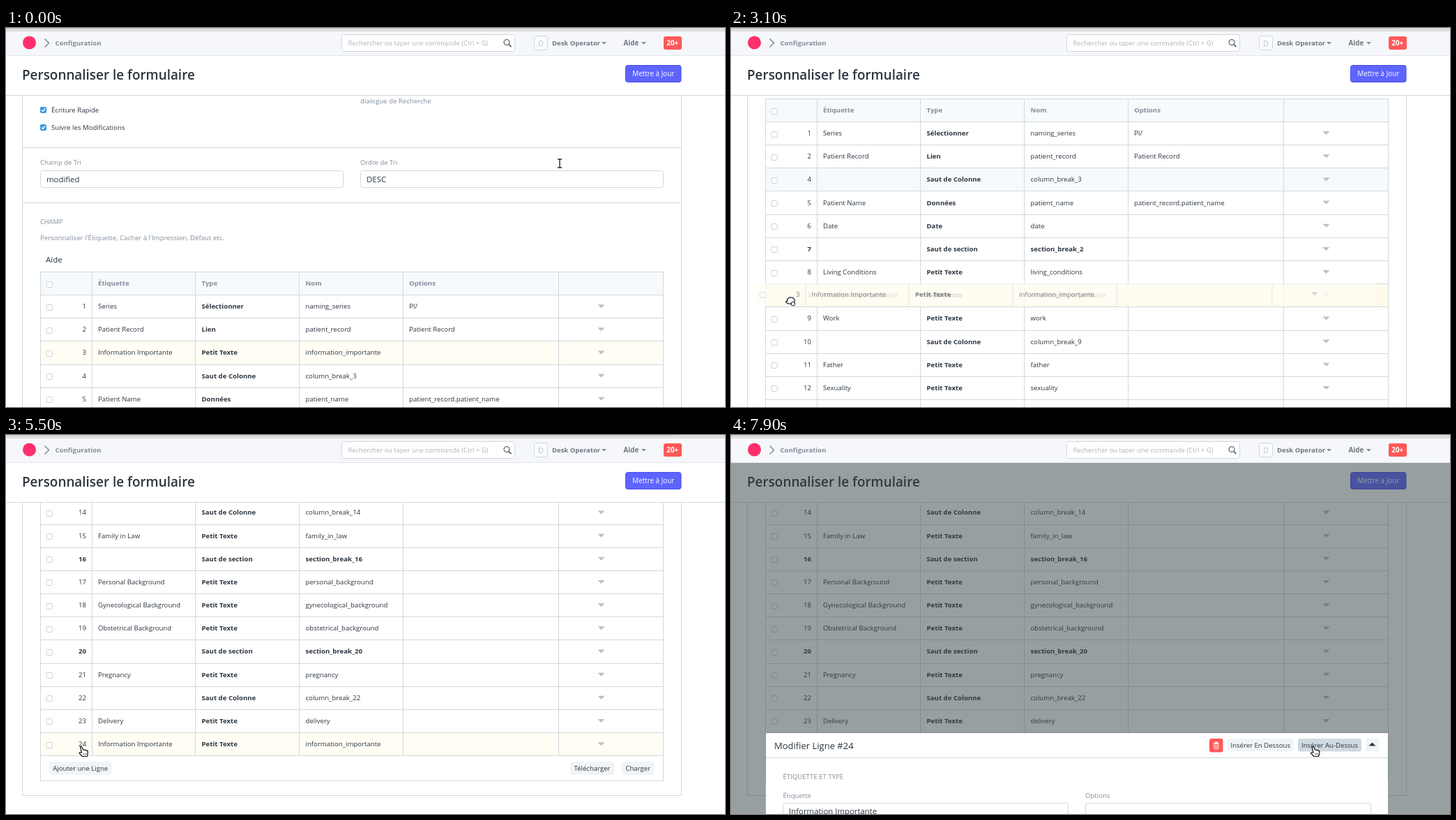
An HTML page with a canvas for the animation above (8 s loop, 1031 by 543 pixels).

```html
<!DOCTYPE html>
<html lang="fr">
<head>
<meta charset="utf-8">
<title>Personnaliser le formulaire</title>
<style>
html, body { margin: 0; width: 100%; height: 100%; overflow: hidden; background: #fff; }
canvas { display: block; width: 100%; height: 100%; }
</style>
</head>
<body>
<canvas id="stage" width="1031" height="543"></canvas>
<script>
const ctx = document.getElementById('stage').getContext('2d');
const INK = '#2c3640', MUTED = '#808d9a', LINE = '#d1d8dd', PALE = '#f7fafc',
  BUTTON = '#f0f4f7', RED = '#ff5858', CREAM = '#fffdf4';
const LOOP = 8000, STEP = 100, PITCH = 33.17, FIRST_ROW = PITCH * 1.5, SMALL = 9.65;
const COLUMNS = [123, 271, 420, 569, 792];

const rows = `Series|Sélectionner|naming_series|PI/
Patient Record|Lien|patient_record|Patient Record
Information Importante|Petit Texte|information_importante
|Saut de Colonne|column_break_3
Patient Name|Données|patient_name|patient_record.patient_name
Date|Date|date
|Saut de section|section_break_2
Living Conditions|Petit Texte|living_conditions
Work|Petit Texte|work
|Saut de Colonne|column_break_9
Father|Petit Texte|father
Sexuality|Petit Texte|sexuality
Mother|Petit Texte|mother
Siblings|Petit Texte|siblings
|Saut de Colonne|column_break_14
Family in Law|Petit Texte|family_in_law
|Saut de section|section_break_16
Personal Background|Petit Texte|personal_background
Gynecological Background|Petit Texte|gynecological_background
Obstetrical Background|Petit Texte|obstetrical_background
|Saut de section|section_break_20
Pregnancy|Petit Texte|pregnancy
|Saut de Colonne|column_break_22
Delivery|Petit Texte|delivery`.split('\n').map((line, i) => {
  const [label, type, name, options = ''] = line.split('|');
  return { id: i + 1, label, type, name, options };
});
const moved = rows[2];
const others = rows.filter(r => r !== moved);

// Keyframes: time, then values
const scrollKeys = [[0, 349.4], [100, 312], [200, 299.8], [1200, 299.8], [1700, 101.3],
  [3500, 101.3], [4400, -369.5]];
const dragKeys = [[2700, 0, 217], [2800, -3, 228], [2900, -8, 262], [3000, -13, 320],
  [3100, -16.5, 381.6], [3300, -22, 475], [3500, -22, 520], [4600, -22, 520],
  [4700, 0, 177.7], [4800, 3, 290], [4900, 7, 471], [5000, 9, 443.5]];
const cursorKeys = [[0, 790, 187], [300, 790, 187], [900, 768, 210], [1500, 768, 210],
  [2000, 143, 243], [2100, 97.5, 219], [2300, 94.5, 220], [5500, 104, 446], [5700, 104, 446],
  [6200, 1005, 430], [6300, 960, 436], [6400, 881.5, 441], [6600, 852, 441], [6800, 850, 439],
  [7300, 851, 440], [7700, 832, 447], [7900, 830.5, 446]];
const fadeKeys = [[6900, 0], [7000, 0.12], [7200, 0.5]];

function at(keys, t) {
  const i = keys.findIndex(k => k[0] > t);
  if (i === 0) return keys[0].slice(1);
  if (i < 0) return keys[keys.length - 1].slice(1);
  const a = keys[i - 1], b = keys[i], p = (t - a[0]) / (b[0] - a[0]);
  return a.slice(1).map((v, n) => v + (b[n + 1] - v) * p);
}

function rect(x, y, w, h, color) {
  ctx.fillStyle = color;
  ctx.fillRect(x, y, w, h);
}
function box(x, y, w, h, fill, stroke, r = 3) {
  ctx.beginPath();
  ctx.roundRect(x, y, w, h, r);
  if (fill) { ctx.fillStyle = fill; ctx.fill(); }
  if (stroke) { ctx.strokeStyle = stroke; ctx.lineWidth = 1; ctx.stroke(); }
}
function text(s, x, cy, size = SMALL, color = INK, weight = 500, align = 'left') {
  ctx.font = `${weight} ${size}px "Open Sans", "Noto Sans", sans-serif`;
  ctx.textAlign = align;
  ctx.fillStyle = color;
  ctx.fillText(s, x, Math.round(cy + size * 0.36));
}
function line(points, color, width) {
  ctx.beginPath();
  points.forEach(([x, y]) => ctx.lineTo(x, y));
  ctx.strokeStyle = color;
  ctx.lineWidth = width;
  ctx.stroke();
}
function caret(x, y, half, h, color) {
  ctx.beginPath();
  ctx.moveTo(x - half, y - h / 2);
  ctx.lineTo(x + half, y - h / 2);
  ctx.lineTo(x, y + h / 2);
  ctx.fillStyle = color;
  ctx.fill();
}
const hline = (x1, x2, y) => rect(x1, Math.floor(y), x2 - x1, 1, LINE);
const vline = (x, y1, y2) => rect(x, y1, 1, y2 - y1, LINE);

function button(s, x, w, cy, fill = BUTTON) {
  box(x, cy - 9.5, w, 18.5, fill);
  text(s, x + w / 2, cy - 0.3, 9.6, INK, 500, 'center');
}
function input(s, x, y, w) {
  box(x + 0.5, Math.floor(y) + 0.5, w, 24, '#fff', LINE);
  text(s, x + 9, y + 12.3, 11.4);
}
function checked(y, label) {
  box(49, y - 4.5, 9, 9, '#3b99e0', null, 2);
  line([[51, y], [53, y + 2], [56.3, y - 2.3]], '#fff', 1.4);
  text(label, 65, y);
}
function emptyCheck(y) {
  box(58, Math.round(y) - 2.5, 8.5, 8, '#fff', '#c9d0d6', 2);
}

const fillRow = (cy, color) => rect(50, Math.floor(cy - PITCH / 2) + 1, 892, 33, color);

function rowCells(cy, row, num) {
  const top = Math.floor(cy - PITCH / 2), mid = cy - 0.5;
  const weight = row.type === 'Saut de section' ? 700 : 500;
  COLUMNS.forEach(x => vline(x, top + 1, top + 34));
  emptyCheck(mid);
  text(num, 115, mid, SMALL, INK, weight, 'right');
  text(row.label, 132, mid);
  text(row.type, 280.5, mid, SMALL, INK, 700);
  text(row.name, 429.5, mid, SMALL, INK, weight);
  text(row.options, 578, mid);
  caret(853.5, mid, 5, 5, '#b8c0c7');
}

function topFields(y) {
  text('dialogue de Recherche', 508, y - 245, SMALL, MUTED);
  checked(y - 232, 'Écriture Rapide');
  checked(y - 207, 'Suivre les Modifications');
  hline(24, 968, y - 178);
  text('Champ de Tri', 49, y - 156.5, 9.5, MUTED);
  text('Ordre de Tri', 508, y - 156.5, 9.5, MUTED);
  input('modified', 49, y - 145, 434);
  input('DESC', 508, y - 145, 434);
  hline(24, 968, y - 99.2);
  text('CHAMP', 49, y - 72, 9.2, MUTED);
  text("Personnaliser l'Étiquette, Cacher à l'Impression, Défaut etc.", 49, y - 49, SMALL, MUTED);
  text('Aide', 57, y - 17.3, 11.5);
}

function grid(t, y, drag, dragging) {
  const end = y + 25 * PITCH;
  rect(50, y, 892, PITCH, PALE);
  [49, 942].forEach(x => vline(x, Math.floor(y), end + 36));
  COLUMNS.forEach(x => vline(x, Math.floor(y), Math.floor(y + PITCH)));
  hline(49, 943, y);
  hline(49, 943, y + PITCH);
  emptyCheck(y + 16.2);
  ['Étiquette', 'Type', 'Nom', 'Options'].forEach((s, i) =>
    text(s, [132, 280.5, 429.5, 578][i], y + 16.2, SMALL, MUTED, 700));

  const last = t < 4700 ? 16 : 24;
  const slot = t < 2700 ? 3
    : Math.max(3, Math.min(last, Math.round((drag[1] - y - FIRST_ROW) / PITCH) + 1));
  const list = [...others.slice(0, slot - 1), moved, ...others.slice(slot - 1)];
  list.forEach((row, i) => {
    const cy = y + FIRST_ROW + i * PITCH;
    if (cy < 70 || cy > 570) return;
    const ghost = row === moved && dragging;
    if (row === moved) fillRow(cy, ghost ? '#fffbeb' : CREAM);
    else if (row.id === 4 && t >= 2800 && t < 3600) fillRow(cy, PALE);
    hline(49, 943, y + (i + 2) * PITCH);
    ctx.globalAlpha = ghost ? 0.5 : 1;
    rowCells(cy, row, t < 5500 ? row.id : i + 1);
    ctx.globalAlpha = 1;
  });

  hline(50, 942, end + 36);
  button('Ajouter une Ligne', 62, 89.5, end + 18);
  button('Télécharger', 809, 63, end + 18);
  button('Charger', 883, 46.5, end + 18);
}

function content(t) {
  const [y] = at(scrollKeys, t), drag = at(dragKeys, t);
  const dragging = (t >= 2700 && t < 4100) || (t >= 4700 && t < 5500);
  ctx.save();
  ctx.beginPath();
  ctx.rect(0, 97, 1031, 446);
  ctx.clip();
  const cardEnd = y + 25 * PITCH + 57;
  vline(23, 97, Math.min(543, cardEnd));
  vline(968, 97, Math.min(543, cardEnd));
  hline(23, 969, cardEnd);
  topFields(y);
  grid(t, y, drag, dragging);
  if (dragging) {
    ctx.translate(drag[0], 0);
    ctx.globalAlpha = 0.65;
    fillRow(drag[1], CREAM);
    rowCells(drag[1], moved, 3);
  }
  ctx.restore();
  return dragging ? [94.5 + drag[0], drag[1] + 2.5] : null;
}

function pageHead() {
  text('Personnaliser le formulaire', 23, 67, 18.9, INK, 600);
  box(888.5, 53.5, 79.5, 24, '#5e64ff', '#484fec');
  text('Mettre à Jour', 928.3, 65, 9.9, '#fff', 500, 'center');
  rect(0, 96, 1031, 1, LINE);
}

function navbar() {
  rect(0, 0, 1031, 40, '#f5f7fa');
  rect(0, 0, 1031, 5, '#dedede');
  rect(0, 0, 957, 1, '#c4c4c4');
  rect(0, 39, 1031, 1, '#e3e8ec');
  ctx.beginPath();
  ctx.arc(33.5, 21, 9.5, 0, Math.PI * 2);
  ctx.fillStyle = '#ff2f6d';
  ctx.fill();
  line([[55.5, 15.5], [61.5, 21.5], [55.5, 27.5]], MUTED, 1.5);
  text('Configuration', 70.5, 21.5, 9.6, MUTED, 700);
  box(481.5, 9.5, 248, 24, '#fff', LINE);
  text('Rechercher ou taper une commande (Ctrl + G)', 490.5, 21.5, 9.4, '#abb3bb');
  ctx.beginPath();
  ctx.arc(718, 20.5, 3.9, 0, Math.PI * 2);
  ctx.strokeStyle = '#5c6873';
  ctx.lineWidth = 1.3;
  ctx.stroke();
  line([[720.8, 23.3], [724.5, 27]], '#5c6873', 1.8);
  box(757.5, 11.5, 19, 20, '#fafbfc', LINE);
  text('D', 767, 21.8, 10.5, '#b8c2cc', 500, 'center');
  text('Desk Operator', 783, 21.2, 9.5, '#6c7884', 700);
  caret(857.5, 21.8, 3.5, 3.5, MUTED);
  text('Aide', 885.5, 21.2, 9.8, '#6c7884', 700);
  caret(914.5, 21.8, 3.5, 3.5, MUTED);
  box(943, 12, 26, 19, RED);
  text('20+', 955.7, 21.3, 9.8, '#fff', 700, 'center');
}

function trashIcon(x, y) {
  rect(x - 4, y - 4, 8, 1, '#fff');
  rect(x - 1.5, y - 5.5, 3, 1.5, '#fff');
  box(x - 3, y - 2.5, 6, 7.5, null, '#fff', 1);
  [-1, 1].forEach(d => rect(x + d - 0.4, y - 1, 0.8, 4.5, '#fff'));
}

function editor(t) {
  if (t < 7000) return;
  const [shade] = at(fadeKeys, t);
  rect(0, 40, 1031, 503, `rgba(51, 65, 67, ${shade})`);
  ctx.save();
  ctx.beginPath();
  ctx.rect(50, 427, 892, 36 + 80 * Math.min(1, (t - 6900) / 300));
  ctx.clip();
  rect(50, 427, 892, 116, '#fff');
  text('Modifier Ligne #24', 62, 445, 13);
  box(686, 435, 19.5, 19.5, RED);
  trashIcon(695.8, 444.8);
  button('Insérer En Dessous', 712, 94.5, 444.5);
  button('Insérer Au-Dessus', 813, 91, 444.5, t < 7100 ? BUTTON : '#cfd9e0');
  box(910, 435, 19.5, 18.5, BUTTON);
  caret(919.5, 443, 5, -5, INK);
  hline(50, 942, 462);
  text('ÉTIQUETTE ET TYPE', 74.5, 490, 9.6, MUTED);
  text('Étiquette', 74.5, 516.5, 9.6, MUTED);
  text('Options', 508, 516.5, 9.6, MUTED);
  input('Information Importante', 74, 527, 409);
  input('', 508, 527, 409);
  ctx.restore();
}

const shapes = {
  arrow: 'M.7 .7V13.5L3.6 10.8L5.8 15.4L7.9 14.4L5.8 10H9.6Z',
  hand: 'M2.5 1.2Q4-.1 5.2 1.5L6.6 4.8L11 5.6Q13.8 6.4 13.4 9L12.4 14.5H5.4L1.2 10.2Q.6 8 4.5 9.2Z',
  fist: 'M3 7Q1.6 3.2 5 3Q6 .8 8.3 2.2Q10.6 1.2 11.3 3.4Q13.6 3.6 13.3 7L12.2 11H4.5L.8 8.8Q1 6.8 3 7Z'
};
for (const key in shapes) shapes[key] = new Path2D(shapes[key]);

function cursor(t, grip) {
  if (t >= 4100 && t < 4700) return;
  const [x, y] = grip || at(cursorKeys, t);
  ctx.save();
  ctx.translate(x, y);
  if (t < 500) {
    [['#fff', 3], ['#111', 1.3]].forEach(([color, w]) => {
      line([[1, 1], [7, 1]], color, w);
      line([[4, 1], [4, 13]], color, w);
      line([[1, 13], [7, 13]], color, w);
    });
  } else {
    const arrow = t < 1700 || (t > 5500 && x > 941);
    const shape = shapes[grip ? 'fist' : arrow ? 'arrow' : 'hand'];
    ctx.fillStyle = '#fff';
    ctx.strokeStyle = '#111';
    ctx.lineWidth = 1.2;
    ctx.lineJoin = 'round';
    ctx.fill(shape);
    ctx.stroke(shape);
    if (grip) box(8.5, 8.5, 5, 5, '#fff', '#111', 1);
    else if (!arrow) [7.3, 9.3, 11.2].forEach(d => line([[d, 10], [d - 0.3, 12.5]], '#555', 0.8));
  }
  ctx.restore();
}

function draw(now) {
  const t = Math.floor((now % LOOP) / STEP) * STEP;
  rect(0, 0, 1031, 543, '#fff');
  const grip = content(t);
  pageHead();
  editor(t);
  navbar();
  cursor(t, grip);
}

let start;
function tick(now) {
  start ??= now;
  draw(now - start);
  requestAnimationFrame(tick);
}
requestAnimationFrame(tick);
</script>
</body>
</html>
```
